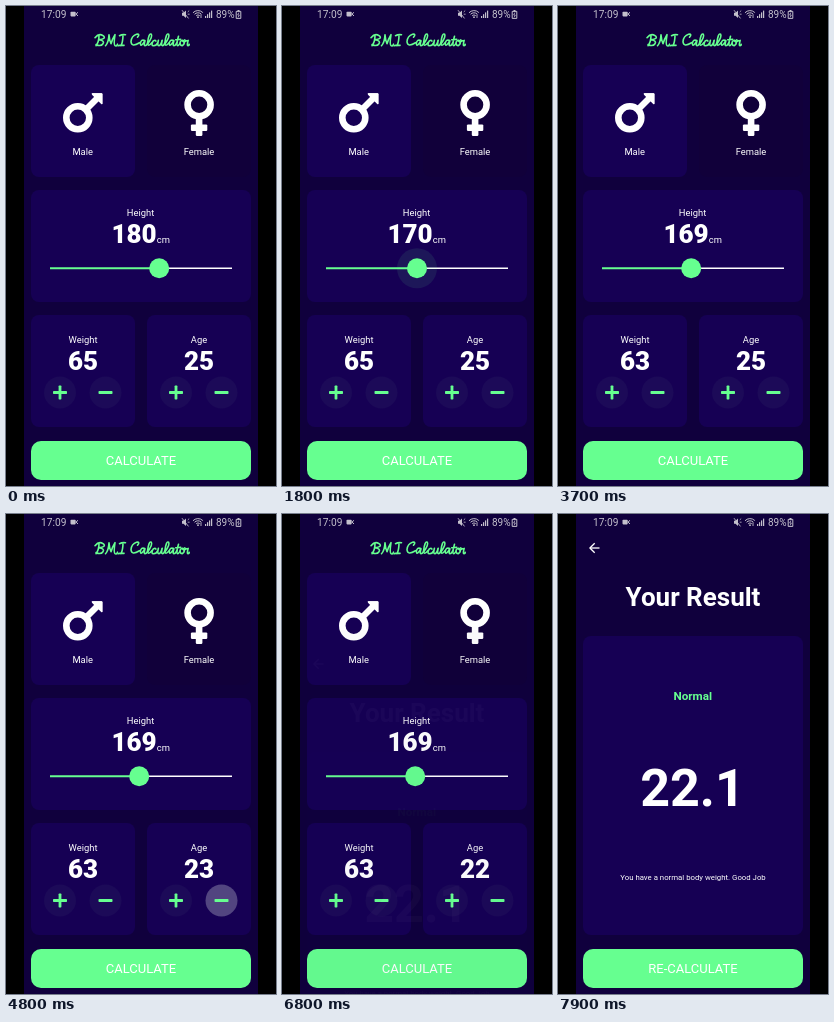
Write an HTML page with a canvas that moves like this. It is 270 px wide and 480 px high and loops after 8 s.

```html
<!DOCTYPE html>
<html lang="en">
<head>
<meta charset="utf-8">
<title>BMI Calculator</title>
<style>
  html, body { margin: 0; width: 100%; height: 100%; overflow: hidden; background: #000; }
  canvas { display: block; width: 270px; height: 480px; }
</style>
</head>
<body>
<canvas id="stage" role="img" aria-label="BMI Calculator"></canvas>
<script>
const W = 270, H = 480, LOOP = 8000;
const SCREEN = { x: 18, w: 234 };
const COLOR = {
  bg: '#10003d', card: '#160054', idle: '#11003a', round: '#1c0a58',
  green: '#66ff90', white: '#fff', status: '#c4c0cc'
};
const scale = Math.max(1, window.devicePixelRatio || 1);

function setup(canvas) {
  canvas.width = W * scale;
  canvas.height = H * scale;
  const c = canvas.getContext('2d');
  c.scale(scale, scale);
  c.lineJoin = 'round';
  return c;
}
const stage = setup(document.getElementById('stage'));
const layer = setup(document.createElement('canvas'));

// --- helpers ---
const clamp = (v, lo = 0, hi = 1) => Math.min(hi, Math.max(lo, v));
const span = (t, from, to) => clamp((t - from) / (to - from));

function bezier(x1, y1, x2, y2) {
  const at = (a, b, u) => 3 * a * u * (1 - u) ** 2 + 3 * b * u * u * (1 - u) + u ** 3;
  return x => {
    let lo = 0, hi = 1;
    for (let i = 0; i < 24; i++) {
      const mid = (lo + hi) / 2;
      if (at(x1, x2, mid) < x) lo = mid; else hi = mid;
    }
    return at(y1, y2, lo);
  };
}
const easeIn = bezier(.42, 0, 1, 1);
const easeInOut = bezier(.42, 0, .58, 1);
const fastOutSlowIn = bezier(.4, 0, .2, 1);

function text(c, str, x, y, size, { weight = 400, color = COLOR.white, align = 'center' } = {}) {
  c.font = `${weight} ${size}px Roboto, sans-serif`;
  c.textAlign = align;
  c.fillStyle = color;
  c.fillText(str, x, y);
}

function box(c, x, y, w, h, r, color) {
  c.fillStyle = color;
  c.beginPath();
  c.roundRect(x, y, w, h, r);
  c.fill();
}

function disc(c, x, y, r, color) {
  c.fillStyle = color;
  c.beginPath();
  c.arc(x, y, r, 0, Math.PI * 2);
  c.fill();
}

function line(c, points, width, color, cap = 'butt') {
  c.strokeStyle = color;
  c.lineWidth = width;
  c.lineCap = cap;
  c.beginPath();
  points.forEach(([x, y]) => c.lineTo(x, y));
  c.stroke();
}

function ring(c, x, y, r, width, color, from = 0, to = Math.PI * 2) {
  c.strokeStyle = color;
  c.lineWidth = width;
  c.lineCap = 'butt';
  c.beginPath();
  c.arc(x, y, r, from, to);
  c.stroke();
}

function background(c) {
  c.fillStyle = COLOR.bg;
  c.fillRect(SCREEN.x, 0, SCREEN.w, H);
}

function button(c, label) {
  box(c, 25, 435, 220, 39, 10, COLOR.green);
  text(c, label, 135, 459, 13);
}

// --- script heading, drawn with a pen ---
const pen = {
  B: 'M4-10Q4-4 1 0M0-8Q4-13 8-10T4-6Q10-5 8-2T1-1',
  M: 'M0 0Q3-3 3.5-11Q4-5 5.5-2Q7-7 9.5-11Q8-1 9.5 0T12-1.5',
  I: 'M1.5-10Q4-11.5 7.5-11M5-11Q5-4 3 0M0 0Q3-1 6-.3',
  C: 'M7-8.5Q10-12 6-11.5Q1-10 .5-4Q1 2 9-3',
  a: 'M5-5Q1-7 .3-2Q1 2 5-5Q3.5 0 5 0T8-3',
  l: 'M1-2Q6-9 4.5-11.5Q2-13 .8-3Q1 2 5-3',
  c: 'M4.3-4.5Q4-6.5 1.5-4.5Q-1 0 2 0T6-3',
  u: 'M1-5.5Q-.5 0 1.5 0Q3.5-.5 4.8-5.5Q3.5 0 5 0T7.5-3',
  t: 'M2.8-9.5Q0 0 2 0Q3 0 4.5-2.5M0-6L5-6.3',
  o: 'M2.8-5.3Q0-5 .4-2Q1 0 2.4 0Q5-1 4.5-4Q4-5.5 2.8-5.3Q3-3 6-4.5',
  r: 'M.5-5.8Q1.5-4.5 4-5.3Q2.5 0 3.8 0T5-1.5'
};
const advance = { B: 10.5, M: 12.5, I: 8, ' ': 4.5, C: 9.5, a: 6.8, l: 4.8, c: 5.8, u: 6.7, t: 4, o: 4.5, r: 5 };

function heading(c) {
  c.save();
  c.translate(89, 39.7);
  c.strokeStyle = COLOR.green;
  c.lineWidth = 1.6;
  c.lineCap = 'round';
  for (const ch of 'BMI Calculator') {
    if (pen[ch]) c.stroke(new Path2D(pen[ch]));
    c.translate(advance[ch], 0);
  }
  c.restore();
}

// --- input page ---
function maleIcon(c) {
  ring(c, 71.8, 111.8, 11.5, 6.6, COLOR.white);
  line(c, [[81, 102.6], [92, 91.6]], 6.4, COLOR.white);
  c.fillStyle = COLOR.white;
  c.beginPath();
  c.moveTo(85.4, 87.3);
  c.arcTo(96.4, 87.3, 96.4, 98, 1.2);
  c.lineTo(96.4, 98.2);
  c.closePath();
  c.fill();
  line(c, [[86.2, 88], [95.7, 88], [95.7, 97.5], [86.2, 88]], 1.5, COLOR.white);
}

function femaleIcon(c) {
  ring(c, 193.1, 98.8, 11.5, 6.6, COLOR.white);
  box(c, 189.8, 111, 6.6, 18.9, 1.2, COLOR.white);
  box(c, 184.9, 118.4, 16.4, 6.6, 1.2, COLOR.white);
}

const PRESS = 100, RIPPLE = 390;
const weightTaps = [3000, 3300], ageTaps = [4500, 4700, 5200];
const countDown = (start, taps, t) => start - taps.filter(p => t >= p + PRESS).length;

function ripple(c, x, y, taps, t) {
  const last = taps.filter(p => t >= p).pop();
  if (last === undefined) return;
  const age = t - last;
  const alpha = .24 * span(age, -40, 60) * (1 - span(age, 180, RIPPLE));
  if (alpha > 0) disc(c, x, y, 16, `rgba(255,255,255,${alpha})`);
}

function counter(c, left, label, value, taps, t) {
  const mid = left + 52, y = 386.5;
  const plus = left + 29, minus = left + 74.5;
  box(c, left, 309, 104, 112, 8, COLOR.card);
  text(c, label, mid, 337, 9.4);
  text(c, value, mid, 363.5, 26, { weight: 900 });
  disc(c, plus, y, 16, COLOR.round);
  disc(c, minus, y, 16, COLOR.round);
  ripple(c, minus, y, taps, t);
  box(c, plus - 7, y - 1.4, 14, 2.8, .7, COLOR.green);
  box(c, plus - 1.4, y - 7, 2.8, 14, .7, COLOR.green);
  box(c, minus - 7, y - 1.4, 14, 2.8, .7, COLOR.green);
}

function slider(c, t) {
  const height = Math.round(180 - 11 * easeInOut(span(t, 1050, 1950)));
  const x = 44 + (height - 120) * 1.82, y = 262.3;
  const halo = span(t, 1000, 1120) * (1 - span(t, 2050, 2300));

  box(c, 25, 184, 220, 112, 8, COLOR.card);
  text(c, 'Height', 134.5, 209.7, 9.4);
  text(c, height, 105.4, 236.5, 26, { weight: 900, align: 'left' });
  text(c, 'cm', 150.8, 236.5, 9.4, { align: 'left' });
  line(c, [[x, y], [226, y]], 1.4, COLOR.white);
  line(c, [[44, y], [x, y]], 1.9, COLOR.green);
  if (halo > 0) disc(c, x, y, 20 * halo, 'rgba(102,255,144,.09)');
  disc(c, x, y, 10, COLOR.green);
}

function inputPage(c, t) {
  background(c);
  heading(c);
  box(c, 25, 59, 104, 112, 8, COLOR.card);
  box(c, 141, 59, 104, 112, 8, COLOR.idle);
  maleIcon(c);
  femaleIcon(c);
  text(c, 'Male', 76.7, 148.6, 9.4);
  text(c, 'Female', 193, 148.6, 9.4);
  slider(c, t);
  counter(c, 25, 'Weight', countDown(65, weightTaps, t), weightTaps, t);
  counter(c, 141, 'Age', countDown(25, ageTaps, t), ageTaps, t);
  button(c, 'CALCULATE');
}

// --- result page ---
function resultPage(c) {
  background(c);
  line(c, [[41.5, 34], [32, 34]], 1.3, COLOR.white);
  line(c, [[36.7, 29.2], [31.9, 34], [36.7, 38.8]], 1.3, COLOR.white);
  text(c, 'Your Result', 135, 92, 26, { weight: 700 });
  box(c, 25, 122, 220, 299, 8, COLOR.card);
  text(c, 'Normal', 134.7, 185.8, 11.7, { weight: 700, color: COLOR.green });
  text(c, '22.1', 134.5, 291.5, 52, { weight: 700 });
  text(c, 'You have a normal body weight. Good Job', 135, 365.7, 7.8);
  button(c, 'RE-CALCULATE');
}

// --- system bar ---
function statusBar(c) {
  const col = COLOR.status;
  text(c, '17:09', 35, 11.8, 10.2, { color: col, align: 'left' });
  box(c, 64.5, 5.8, 5.2, 4.6, .8, col);
  line(c, [[72, 6.3], [70, 8.1], [72, 9.9]], 1, col);

  c.fillStyle = col;
  c.beginPath();
  [[176, 6.8], [177.5, 6.8], [180, 4.5], [180, 12], [177.5, 9.7], [176, 9.7]].forEach(p => c.lineTo(...p));
  c.fill();
  line(c, [[176, 4.2], [182.5, 12.4]], .9, col);
  line(c, [[181.7, 6], [183.2, 4.6]], .8, col);
  line(c, [[181.7, 8.2], [183.6, 8.2]], .8, col);

  for (const r of [2.5, 4.7, 6.9]) ring(c, 192, 11.5, r, 1, col, -Math.PI * .76, -Math.PI * .24);
  disc(c, 192, 11.2, .9, col);
  line(c, [[195, 8.5], [195, 12]], .9, col);
  c.fillStyle = col;
  for (let i = 0; i < 4; i++) c.fillRect(199 + i * 2, 10 - i * 1.8, 1.2, 2 + i * 1.8);
  text(c, '89%', 210, 11.8, 10, { color: col, align: 'left' });
  box(c, 231.5, 4, 2, 1.4, 0, col);
  c.strokeStyle = col;
  c.lineWidth = 1;
  c.strokeRect(230.2, 5.4, 4.6, 7);
  line(c, [[232.9, 6.5], [231.7, 9], [233.3, 9], [232.1, 11.4]], .8, col);
}

function draw(t) {
  const c = stage;
  c.fillStyle = '#000';
  c.fillRect(0, 0, W, H);
  const turn = span(t, 6767, 7067);
  if (turn < 1) inputPage(c, t);
  if (turn > 0) {
    layer.clearRect(0, 0, W, H);
    resultPage(layer);
    c.globalAlpha = easeIn(turn);
    c.drawImage(layer.canvas, 0, 120 * (1 - fastOutSlowIn(turn)), W, H);
    c.globalAlpha = 1;
  }
  statusBar(c);
}

const start = performance.now();
function tick() {
  draw((performance.now() - start) % LOOP);
  requestAnimationFrame(tick);
}
tick();
</script>
</body>
</html>
```
